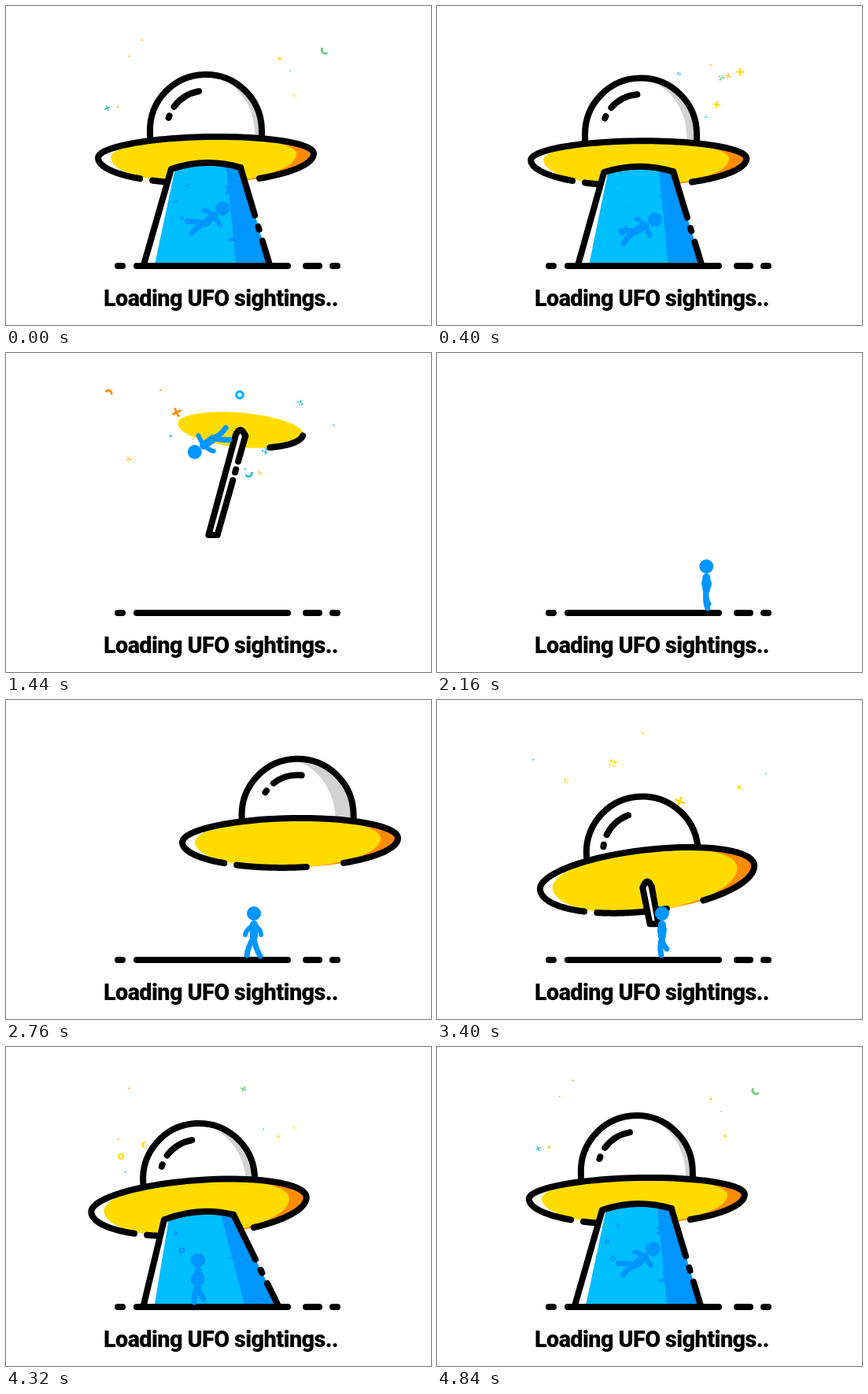
An HTML page with a canvas that plays this animation: 540 by 405 pixels, repeating every 4880 ms.

```html
<!DOCTYPE html>
<html lang="en">
<head>
<meta charset="utf-8">
<title>Loading</title>
<style>
  html, body { margin: 0; width: 100%; height: 100%; overflow: hidden; background: #fff; }
  canvas { position: absolute; left: 0; top: 0; }
  p {
    position: absolute; left: 273px; top: 356px; width: max-content; margin: 0;
    transform: translateX(-50%);
    font: 900 28px/30px Impact, Roboto, sans-serif; font-stretch: 75%;
    letter-spacing: -0.02em; white-space: nowrap; color: #000;
  }
</style>
</head>
<body>
<canvas id="stage" width="540" height="405"></canvas>
<p id="label">Loading UFO sightings..</p>
<script>
const ctx = document.getElementById('stage').getContext('2d');
const LOOP = 4880, STEP = 40, RAD = Math.PI / 180;
const BLACK = '#000', CYAN = '#00beff', BLUE = '#0096ff', YELLOW = '#ffdc00', ORANGE = '#ff8c00';

// time, x, y, tilt, turn, x of the beam's foot
const flight = [
  [0, 254, 190, -1.2, 1, 255],
  [840, 262, 200, 1, 10, 263.5],
  [1140, 272, 198, 2, 10, 268],
  [1440, 298, 96, 5, 10, 263],
  [2300, 700, -60, 6, 20, 276],
  [2760, 361, 178, -1.2, 17, 276],
  [3400, 267, 225, -6.7, -4, 276],
  [4320, 245, 200, -4.1, 4, 260.5],
  [LOOP, 254, 190, -1.2, 1, 255]
];
// time, x, y, rotation of the lifted person
const lifting = [
  [-560, 244, 296, 0],
  [0, 256, 273, 50],
  [840, 255, 297, 70],
  [1440, 260, 111, 234],
  [1600, 290, 70, 300]
];

const clamp = v => Math.max(0, Math.min(1, v));
const mix = (a, b, k) => a + (b - a) * k;
const ramp = (t, from, to) => clamp((t - from) / (to - from));
const ease = (t, from, to) => {
  const v = ramp(t, from, to);
  return v * v * (3 - 2 * v);
};

// Smooth interpolation through the keys without overshoot
function track(keys, t) {
  let i = 0;
  while (i < keys.length - 2 && t >= keys[i + 1][0]) i++;
  const a = keys[i], b = keys[i + 1], span = b[0] - a[0], u = ramp(t, a[0], b[0]);
  const slope = (n, c) => n < 0 || n > keys.length - 2 ? 0 :
    (keys[n + 1][c] - keys[n][c]) / (keys[n + 1][0] - keys[n][0]);
  const tangent = (n, c) => {
    const p = slope(n - 1, c), q = slope(n, c);
    return p * q <= 0 ? 0 : 2 * p * q / (p + q);
  };
  return a.slice(1).map((from, k) => {
    const c = k + 1, u2 = u * u, u3 = u2 * u;
    return from + (b[c] - from) * (3 * u2 - 2 * u3) +
      span * (tangent(i, c) * (u3 - 2 * u2 + u) + tangent(i + 1, c) * (u3 - u2));
  });
}

function stroke(color, width) {
  ctx.strokeStyle = color;
  ctx.lineWidth = width;
  ctx.stroke();
}

function fill(color) {
  ctx.fillStyle = color;
  ctx.fill();
}

function path(...pts) {
  ctx.beginPath();
  for (let i = 0; i < pts.length; i += 2) ctx.lineTo(pts[i], pts[i + 1]);
}

function arc(x, y, r, from = 0, to = 360) {
  ctx.beginPath();
  ctx.arc(x, y, r, from * RAD, to * RAD);
}

function line(color, width, ...pts) {
  path(...pts);
  stroke(color, width);
}

// Confetti
let seed = 23;
const random = (from, to) => {
  seed = seed * 16807 % 2147483647;
  return from + (to - from) * seed / 2147483647;
};
const pick = list => list[Math.floor(random(0, list.length))];

const shapes = {
  cross(color, r, w) {
    line(color, w, -r, -r * 0.4, r, r * 0.4);
    line(color, w, -r * 0.4, r, r * 0.4, -r);
  },
  ring(color, r, w) {
    arc(0, 0, r * 0.8);
    stroke(color, w);
  },
  arc(color, r, w) {
    arc(0, r * 0.5, r, 200, 340);
    stroke(color, w * 1.2);
  },
  dots(color, r, w) {
    line(color, w, -r, 0, -r * 0.5, 0);
    line(color, w, r * 0.1, r * 0.4, r * 0.2, r);
    line(color, w, 0, -r * 0.8, 0, -r * 0.8);
    line(color, w, r * 0.9, 0, r * 0.9, 0);
  }
};

const scatter = (count, make) => Array.from({ length: count }, (_, i) => ({
  shape: pick(Object.values(shapes)), angle: random(0, 6), ...make(i)
}));
const skyBits = scatter(52, i => ({
  peak: i % 4 ? random(3300, 6300) : random(1250, 1650),
  color: pick([YELLOW, YELLOW, '#ffb400', ORANGE, '#00b4ff', '#78d08c', '#32c3c8']),
  x: random(120, 420), y: random(42, 165), size: 1 + 5 * random(0, 1) ** 1.5
}));
const beamBits = scatter(24, () => ({
  peak: random(0, LOOP), color: BLUE,
  x: random(215, 300), y: random(225, 320), size: random(2, 8)
}));

function drawConfetti(bits, t, life = 380) {
  for (const { peak, shape, color, x, y, size, angle } of bits) {
    const age = (t - peak + LOOP * 1.5) % LOOP - LOOP / 2;
    if (Math.abs(age) >= life) continue;
    const r = size * Math.cos(age / life * Math.PI / 2);
    ctx.save();
    ctx.translate(x, y + age * 0.02);
    ctx.rotate(angle + age * 0.002);
    shape(color, r, Math.max(0.8, r * 0.6));
    ctx.restore();
  }
}

// Oval with separate upper and lower heights, angles in degrees
function oval(cx, rx, up, down, from = 0, to = 360) {
  ctx.beginPath();
  for (let i = 0; i <= 90; i++) {
    const n = mix(from, to, i / 90) * RAD, s = Math.sin(n);
    ctx.lineTo(cx + rx * Math.cos(n), s * (s < 0 ? up : down));
  }
}

function drawDome(turn, trim, w) {
  const x = 0.6 * turn, y = -32, r = 71;
  const outline = () => {
    arc(x, y, r, 180, 180 + 180 * trim);
    if (trim === 1) path(x - r, 8, x - r, y), ctx.arc(x, y, r, Math.PI, 0), ctx.lineTo(x + r, 8);
  };
  if (trim === 1) {
    ctx.save();
    outline();
    fill('#d2d2d2');
    ctx.clip();
    ctx.beginPath();
    ctx.ellipse(x - 8 - 0.9 * turn, y + 4, r, r + 6, 0, 0, 7);
    ctx.rect(x - r, y, r, 60);
    fill('#fff');
    ctx.restore();
  }
  outline();
  stroke(BLACK, w);
  arc(x, y, 50.5, 217 + turn, 217 + turn + 43 * trim);
  stroke(BLACK, w);
  arc(x, y, 50, 199 + turn, 202 + turn);
  stroke(BLACK, w);
}

function drawUfo([x, y, tilt, turn], scale, trim) {
  const w = 8 / scale, lean = Math.abs(tilt);
  const up = 21 + 2.2 * lean + 0.25 * turn, down = 33 + 1.5 * lean;
  ctx.save();
  ctx.translate(x, y);
  ctx.rotate(tilt * RAD);
  ctx.scale(scale, scale);
  if (trim > 0.05) drawDome(turn, trim, w);
  if (trim > 0.5) {
    oval(0, 137, up, down);
    fill('#fff');
    ctx.save();
    ctx.clip();
    ctx.fillStyle = ORANGE;
    ctx.fillRect(25, -60, 120, 120);
    ctx.restore();
  }
  oval(-3 * trim, mix(137, 118, trim), up, down);
  fill(YELLOW);
  oval(0, 137, up, down, mix(365, 128, trim), 420.5);
  stroke(BLACK, w);
  if (trim > 0.5) {
    oval(0, 137, up, down, 81.6, 120);
    stroke(BLACK, w);
  }
  ctx.restore();
}

function drawBeam([x, y, tilt, , foot], scale, open) {
  const top = 44 * open, half = 4 + (74 + 2 * Math.abs(tilt)) * open * open;
  const base = mix(y, 330, open ** 0.28), apex = y + 9 * scale - 4 * (1 - open);
  const slope = top * Math.sin(tilt * RAD);
  const x1 = x - top, y1 = apex + 7 - slope, x2 = x + top, y2 = apex + 7 + slope;
  const b1 = foot - half, b2 = foot + half;
  const outline = () => {
    path(b2, base, b1, base, x1, y1);
    ctx.quadraticCurveTo(x, apex - 7, x2, y2);
  };
  outline();
  fill('#fff');
  if (open > 0.4) {
    ctx.save();
    ctx.clip();
    path(x1 + 9 * open, y1 - 20, x2, y1 - 20, b2, base, b1 + 14 * open, base);
    fill(CYAN);
    path(x2 - 19 * open, y2 - 12, x2 + 8, y2 - 12, b2 + 8, base, b2 - 43 * open, base);
    fill(BLUE);
    ctx.restore();
  }
  outline();
  stroke(BLACK, 8);

  // Right side, broken by a short dash
  const dash = mix(0.31, 0.615, open), gap = mix(0.09, 0.13, open);
  for (const [from, to] of [[0, dash - gap], [dash - 0.015, dash + 0.015], [dash + gap, 1]]) {
    line(BLACK, 8, mix(x2, b2, from), mix(y2, base, from), mix(x2, b2, to), mix(y2, base, to));
  }
}

// Each limb is [x, y] of its end: two legs, then two arms
function walkPose(t) {
  const s = Math.cos((t - 2760) / 853 * 2 * Math.PI), lift = 1 - Math.abs(s);
  return [[-1 - 8 * s, 29], [1 + 7 * s + 5 * lift, 30 - 9 * lift], [-1 - 10 * s, 3], [1 + 8 * s, 3]];
}

function tumblePose(t) {
  const s = 7 * Math.cos(Math.PI * t / 840);
  return [[-9 - s, 21], [6 - s, 26], [14, -8], [-13, -4]];
}

function drawPerson(t) {
  const caught = t < 1700, time = caught ? t : t - LOOP;
  const size = caught ? 1 - ramp(t, 1440, 1580) : ease(t, 1860, 2020);
  if (!size) return;
  const walking = !caught && t < 4320;
  const [x, y, turn] = walking ? [315 - (t - 2760) * 0.0455, 296, 0] : track(lifting, time);
  const float = caught ? 1 : ease(t, 4320, 4840), tumble = tumblePose(time);

  ctx.save();
  ctx.translate(x, y);
  ctx.rotate(turn * RAD);
  ctx.scale(size, size);
  arc(0, -25, 9);
  fill(BLUE);
  line(BLUE, 10, 0, -11, 0, 4);
  walkPose(t).forEach(([wx, wy], i) => {
    const leg = i < 2, joint = leg ? 5 : -11;
    const tx = mix(wx, tumble[i][0], float), ty = mix(wy, tumble[i][1], float);
    const bend = leg ? -3 : 5 * Math.sign(tx);
    ctx.beginPath();
    ctx.moveTo(0, joint);
    ctx.quadraticCurveTo(tx / 2 + bend, (joint + ty) / 2, tx, ty - 1);
    stroke(BLUE, leg ? 7 : 6);
  });
  ctx.restore();
}

function draw(t) {
  const ufo = track(flight, t), away = t > 1560 && t < 2300, leaving = t < 2000;
  const scale = leaving ? 1 - ramp(t, 1140, 1560) ** 2.6 : 1;
  const trim = leaving ? 1 - ease(t, 1180, 1440) : 1;
  const open = leaving ? 1 - ease(t, 1180, 1520) : ease(t, 3330, 3640);

  ctx.clearRect(0, 0, 540, 405);
  ctx.lineCap = ctx.lineJoin = 'round';
  drawConfetti(skyBits, t);
  for (const [from, to] of [[142, 148], [166, 358], [381, 398], [415, 421]]) {
    line(BLACK, 8, from, 330, to, 330);
  }
  if (!away && scale > 0.01) drawUfo(ufo, scale, trim);
  if (open > 0.02) drawBeam(ufo, scale, open);
  if (open > 0.95) drawConfetti(beamBits, t);
  drawPerson(t);
}

// Let the label fill its line in whichever font is installed
const label = document.getElementById('label');
label.style.fontSize = 28 * 298 / label.offsetWidth + 'px';

const start = performance.now();
function tick() {
  const t = (performance.now() - start) % LOOP;
  draw(Math.floor(t / STEP) * STEP);
  requestAnimationFrame(tick);
}
tick();
</script>
</body>
</html>
```
